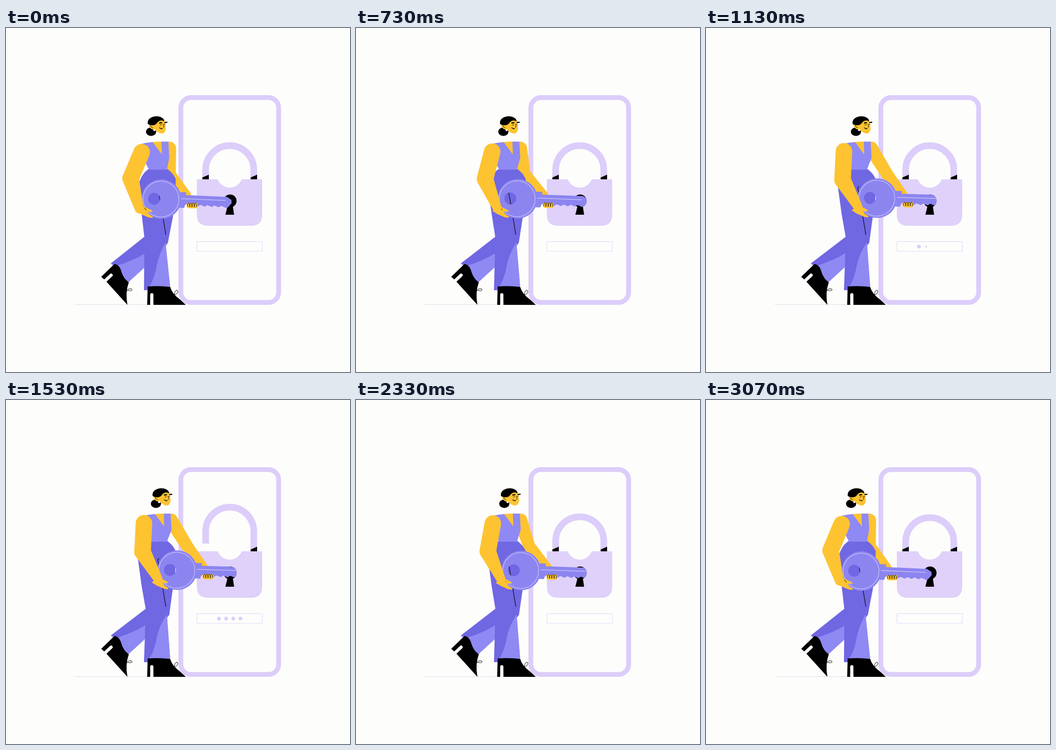
These frames come from a looping animation (748 px wide and 748 px high, 3110 ms). An HTML page with a canvas:

```html
<!DOCTYPE html>
<html lang="en">
<head>
<meta charset="utf-8">
<title>Unlock</title>
<style>
html, body { margin: 0; width: 100%; height: 100%; overflow: hidden; background: #fdfdfc; }
canvas { display: block; width: 748px; height: 748px; }
</style>
</head>
<body>
<canvas id="stage" width="748" height="748"></canvas>
<script>
const ctx = document.getElementById('stage').getContext('2d');
const LOOP = 3110;
const BG = '#fdfdfc', LILAC = '#dccdfa', BODY = '#dfd1fa', INK = '#000';
const SKIN = '#fdc330', DARK = '#7067e2', LIGHT = '#8f89f4', KEY = '#8c85f0';

const clamp = u => Math.max(0, Math.min(1, u));
const ease = u => (1 - Math.cos(Math.PI * clamp(u))) / 2;
const cubic = u => { u = clamp(u); return u < .5 ? 4 * u ** 3 : 1 - (2 - 2 * u) ** 3 / 2; };
const span = (t, a, b) => clamp((t - a) / (b - a));

function fill(d, color) {
  ctx.fillStyle = color;
  ctx.fill(new Path2D(d), 'evenodd');
}

function line(d, color, width) {
  ctx.strokeStyle = color;
  ctx.lineWidth = width;
  ctx.lineCap = ctx.lineJoin = 'round';
  ctx.stroke(new Path2D(d));
}

function oval(x, y, rx, ry, color) {
  ctx.beginPath();
  ctx.ellipse(x, y, rx, ry, 0, 0, 7);
  ctx.fillStyle = color;
  ctx.fill();
}

const disc = (x, y, r, color) => oval(x, y, r, r, color);

function shifted(x, y, draw) {
  ctx.save();
  ctx.translate(x, y);
  draw();
  ctx.restore();
}

// Tapered segment between two round joints
function limb([x1, y1, r1], [x2, y2, r2]) {
  const dir = Math.atan2(y2 - y1, x2 - x1);
  const a = Math.acos((r1 - r2) / Math.hypot(x2 - x1, y2 - y1));
  ctx.beginPath();
  ctx.arc(x1, y1, r1, dir + a, dir - a + 2 * Math.PI);
  ctx.arc(x2, y2, r2, dir - a, dir + a);
  ctx.closePath();
  ctx.fillStyle = SKIN;
  ctx.fill();
}

// Horizontal push of the key: wind up, push in, hold, pull back
function pushAt(t) {
  if (t < 330) return -8 * ease(t / 330);
  if (t < 1130) return -8 + 43.5 * cubic(span(t, 330, 1130));
  return 35.5 * (1 - ease(span(t, 1750, LOOP)));
}

// Blend a value across the four main body poses
const KNOTS = [-8, 0, 13, 35.5];
function poser(p) {
  const i = p < 0 ? 0 : p < 13 ? 1 : 2;
  const u = (p - KNOTS[i]) / (KNOTS[i + 1] - KNOTS[i]);
  return (...v) => v[i] + (v[i + 1] - v[i]) * u;
}

function phone(t) {
  line('M150 601.5H390', '#dedce8', 1);
  ctx.beginPath();
  ctx.roundRect(380.2, 151.2, 212.6, 445.6, 22);
  ctx.strokeStyle = LILAC;
  ctx.lineWidth = 10.5;
  ctx.stroke();
  ctx.strokeStyle = '#e0d6fa';
  ctx.lineWidth = 1;
  ctx.strokeRect(415.5, 464.5, 142, 21);
  const out = 1 - ease(span(t, 2030, 2200));
  for (let i = 0; i < 4; i++) {
    const grow = ease(span(t, 1015 + 75 * i, 1095 + 75 * i));
    disc(463 + 15.6 * i, 475.3, 4 * grow * out, LILAC);
  }
}

function padlock(t) {
  const lift = -30 * (ease(span(t, 1330, 1630)) - ease(span(t, 2000, 2390)));
  ctx.beginPath();
  ctx.moveTo(434.2, 335 + lift);
  ctx.lineTo(434.2, 308 + lift);
  ctx.arc(486.5, 308 + lift, 52.3, Math.PI, 0);
  ctx.lineTo(538.8, 345);
  ctx.strokeStyle = LILAC;
  ctx.lineWidth = 14.5;
  ctx.lineCap = 'butt';
  ctx.stroke();

  ctx.save();
  ctx.beginPath();
  ctx.rect(420, 300, 30, 35 + lift);
  ctx.clip();
  fill('M427 325L441 319V330H427Z', INK);
  ctx.restore();
  fill('M532 325L546 319V330H532Z', INK);

  fill('M415 329H460L465 337A28 28 0 0 0 508 337L513 329H557V406Q557 430 533 430H439Q415 430 415 406Z', BODY);
  disc(487.3, 376, 14, INK);
  fill('M482 386H493L496 406H477Z', INK);
}

function trousers(pose) {
  const dx = pose(-1, 0, 2, 3);
  const x = n => n + dx;
  fill(`M${x(302)} 455L228 512Q246 530 266 553L301 521L330 460Z`, LIGHT);
  fill(`M${x(302)} 453L228 512L240 517Q275 507 304 489L325 460Z`, DARK);
  fill(`M311 306H350Q362 314 369 328L368 380L362 415L${x(352)} 467L${x(347)} 474L357 564Q328 571 300 570L${x(301)} 456L295 405L287 347Q292 318 311 306Z`, DARK);
  fill(`M${x(347)} 466L357 564Q330 570 306 570Q322 550 327 520Q332 492 ${x(347)} 466Z`, LIGHT);
  line('M333 345Q328 346 331 352L336 380L347.5 449', INK, 1.2);
}

function boots() {
  fill('M236 513Q247 515 251 530Q255 544 267 553Q259 575 264 602L216 549L207 541Z', INK);
  line('M213 552L228.5 537.5', BG, 7);
  fill('M308 562Q333 560 357 563Q361 578 378 590L391 602H307Z', INK);
  line('M317 580V598', BG, 7);
  fill('M313.5 598H320.5V602.5H313.5Z', BG);
  line('M264 570Q268 565 274 568Q274 572 270 571.5Z', INK, 1);
  line('M366 580Q367 570 372 570Q376 573 371 578Z', INK, 1);
}

function torso(pose) {
  const dx = pose(-6, 0, 2, 5);
  const x = n => n + dx;
  fill(`M${x(312)} 249Q${x(335)} 245 ${x(358)} 249L${x(356)} 285L${x(320)} 285Z`, SKIN);
  fill(`M${x(294)} 252Q${x(305)} 249 ${x(319)} 248L${x(339)} 275L${x(338)} 247H${x(353)}L${x(355)} 282L350 308H311L${302 + dx / 2} 291L${x(310)} 270Z`, LIGHT);
}

function key(p) {
  ctx.save();
  ctx.beginPath();
  ctx.rect(0, 0, 487.3, 748);
  ctx.arc(487.3, 376, 14, 0, 7);
  ctx.clip();
  ctx.translate(338 + p * .97, 372 - Math.max(p, 0) * .055);
  ctx.rotate((2.5 - Math.max(p, 0) * .025) * Math.PI / 180);

  let blade = 'M40 -17H53V-11H142L152 -5L153 2L145 12';
  for (let x = 141; x > 60; x -= 15) blade += `Q${x} 14 ${x - 5} 11T${x - 13} 10`;
  fill(blade + 'L52 11L50 17H38Z', KEY);
  fill('M-43 0A43 43 0 1 1 43 0A43 43 0 1 1 -43 0ZM-29 0A13 13 0 1 0 -3 0A13 13 0 1 0 -29 0Z', KEY);
  ctx.beginPath();
  ctx.arc(-1, 0, 39, 0, 7);
  ctx.strokeStyle = '#d9d3fb';
  ctx.lineWidth = 1;
  ctx.stroke();
  line('M43 -3H139', '#e4dffc', 1);
  ctx.restore();
}

function farHand(p) {
  shifted(p * .98, -Math.max(p, 0) * .055, () => {
    fill('M393 381L416 381V389Q414 393 408 392H400Q394 392 393 388Z', SKIN);
    for (let i = 0; i < 4; i++) {
      const x = 395 + i * 5;
      line(`M${x} 388Q${x - 1} 381 ${x + 2} 381Q${x + 5} 382 ${x + 4} 389`, INK, .9);
    }
  });
}

function nearHand(p) {
  shifted(p * .95, -Math.max(p, 0) * .04, () => {
    fill('M283 398L297 387L304 390L318 397Q320 400 315 400L308 399L311 405L320 411Q319 414 310 412L294 405Z', SKIN);
    line('M301 391L305 396', INK, 1);
  });
}

function head(pose) {
  shifted(pose(-6, 0, 4.7, 10.5), 0, () => {
    oval(315.5, 225.5, 11, 9.3, INK);
    fill('M311 208L341 197L346 204L347.5 219Q346 227 341 229.5Q334 230 327 224L322 221Q313 220 311 213Z', SKIN);
    fill('M308.5 209C306 196 320 191.5 328 192C338 192 345 198 344 203C338 199 332 201 328 207C324 213 314 212 308.5 209Z', INK);
    line('M334 206.5L338.5 206M345.5 205.5L350 205', INK, 2.4);
    line('M335 211L338 210.5M343.5 210L345.5 209.5', INK, 1.2);
    line('M341.5 209L343.5 215L341.5 216', INK, .9);
    line('M333.5 217Q337 219 340.5 218.5Q338 221 333.5 217', INK, 1);
    line('M314 212Q315 216 319 217', INK, 1);
    disc(322.5, 222, 2.3, BG);
  });
}

function draw(t) {
  const p = pushAt(t), pose = poser(p);
  ctx.fillStyle = BG;
  ctx.fillRect(0, 0, 748, 748);
  phone(t);
  padlock(t);

  const farElbow = [pose(350, 356, 365, 394), pose(316, 318, 317, 318), 13];
  limb([pose(352, 355, 357, 359), 262, 15], farElbow);
  limb(farElbow, [pose(384, 392, 406, 427), pose(366, 365, 364, 363), 11]);

  trousers(pose);
  boots();
  torso(pose);
  key(p);
  farHand(p);
  nearHand(p);

  const elbow = [pose(264, 271, 280, 297), pose(325, 327, 328, 330), 18];
  limb([pose(290, 295, 296, 300), pose(272, 270, 269, 268), 18], elbow);
  limb(elbow, [pose(283, 290, 306, 331), pose(395, 394, 392, 390), 9.5]);
  head(pose);
}

const start = performance.now();
function tick() {
  draw((performance.now() - start) % LOOP);
  requestAnimationFrame(tick);
}
tick();
</script>
</body>
</html>
```
